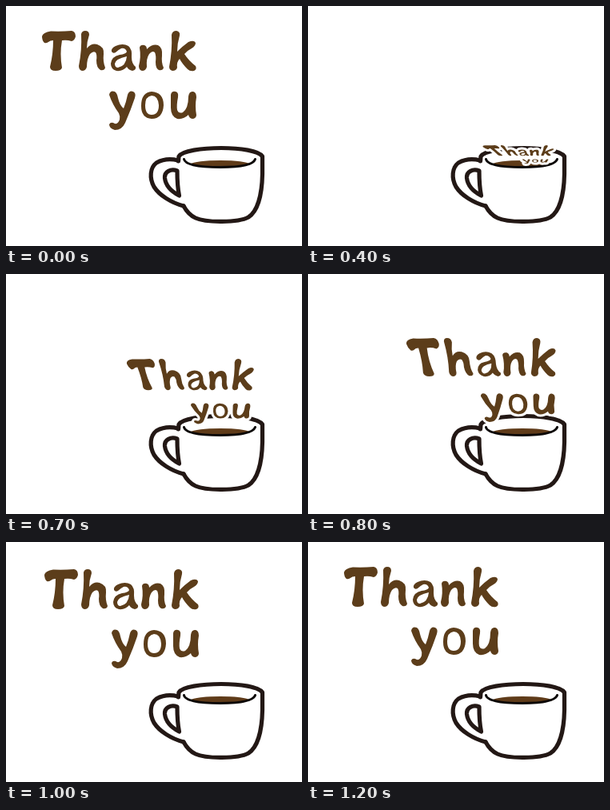
An HTML page for the animation above (1.5 s loop, 370 px wide and 300 px high).

```html
<!DOCTYPE html>
<html lang="en">
<head>
<meta charset="utf-8">
<title>Thank you</title>
<style>
  html, body { margin: 0; width: 100%; height: 100%; overflow: hidden; background: #fff; }
  svg { display: block; width: 370px; height: 300px; }
  .line { fill: none; stroke: #231815; stroke-width: 5.2; stroke-linecap: round; stroke-linejoin: round; }
</style>
</head>
<body>
<svg viewBox="0 0 370 300" role="img" aria-label="Thank you">
  <g class="line">
    <path d="M215,193C207,191 197,191 188,196C180,202 179,215 185,226C192,237 207,246 222,250"/>
    <path d="M214,206C206,203 198,207 198.500,215C199.500,224 207,232 216.500,237Q214,225 214,206Z"/>
    <path d="M215.500,194L216,188C220,181 245,177.500 269,177.500C293,177.500 316,181 320.500,188L320.500,210C320,237 314,257 303,264C290,271 250,271 237,265Q228,261 222,250"/>
  </g>
  <path fill="#5f3b19" d="M229,198Q238,193 268,193Q298,193 306,198Q290,202 268,202Q244,202 229,198Z"/>
  <path d="M222.500,191.500C224,199 243,201.500 268,201.500C293,201.500 309,199 311.500,191.500" fill="none" stroke="#0b0706" stroke-width="3" stroke-linecap="round"/>
  <g id="words">
    <path id="halo" fill="#fff" stroke="#fff" stroke-width="6" stroke-linejoin="round"/>
    <path id="ink" fill="#5c3d1a" fill-rule="evenodd"/>
  </g>
</svg>
<script>
const LOOP = 1500, STEP = 100;
const BOX = { x: 45, y: 31, w: 194, h: 124 };

const letters = [
  // T h a n k
  'M45,38Q46,33 56,31.5Q70,32 82,31Q87,32 87,38Q86,43 82,44Q76,42 70,43Q67,60 70,77Q69,81 62,81Q55,81 55,76Q59,60 59,43Q55,43 53,45Q50,47 48,46Q45,43 45,38Z',
  'M94,35Q95,31 99,31Q104,31 104,36Q101,45 101,53Q107,46 114,48Q123,51 122,60Q121,70 124,77Q123,81 118,80Q113,77 113,68Q114,61 112,58Q109,56 105,60Q101,66 101,76Q100,81 95,81Q91,80 91,75Q95,55 94,35Z',
  'M132,57Q131,53 137,50Q146,46 153,50Q158,54 157,64Q157,72 162,76Q163,80 158,81Q153,80 151,76Q146,82 138,81Q131,79 131,72Q132,63 142,61Q150,60 151,57Q149,52 144,53Q140,55 137,58Q134,60 132,57ZM151,63Q137,66 136,72Q136,77 140,77Q150,75 151,63Z',
  'M167,52Q168,48 173,49Q176,50 176,54Q183,47 190,49Q196,52 195,62Q194,71 197,77Q196,81 191,80Q187,78 187,70Q188,62 186,58Q183,55 179,60Q175,66 176,76Q175,81 170,81Q166,80 166,75Q169,64 167,52Z',
  'M207,36Q208,31 213,31Q218,32 217,37Q214,47 214,57Q221,50 228,45Q235,42 237,46Q237,50 232,53Q226,56 223,60Q229,69 237,75Q239,79 235,81Q230,82 227,79Q220,72 217,66Q213,70 214,77Q213,81 208,81Q204,80 204,76Q208,55 207,36Z',
  // y o u
  'M129,111Q130,105 136,107Q139,109 140,115Q142,124 147,128Q150,121 152,111Q154,105 159,107Q163,109 161,115Q156,130 149,146Q145,155 136,155Q129,153 129,148Q131,144 136,147Q140,148 142,142Q143,138 141,134Q133,123 129,111Z',
  'M182,107Q197,108 197,124Q196,141 182,141Q169,140 169,125Q169,108 182,107ZM182,112Q174,113 174,124Q174,136 182,136Q191,136 191,124Q190,112 182,112Z',
  'M206,111Q207,106 212,107Q216,108 215,114Q213,124 214,130Q216,135 221,133Q228,128 228,113Q229,106 234,107Q238,108 238,114Q236,125 238,136Q238,140 234,141Q229,141 228,136Q222,142 214,141Q206,138 206,127Z'
].join('');

// time, top-left x, top-right x, bottom-left x, bottom-right x, top y, bottom y
const poses = [
  [300, 234, 310, 264, 297, 189, 198],
  [400, 215.5, 311, 250, 298, 174, 197],
  [600, 176, 314, 212.5, 298.5, 132, 190],
  [800, 120.5, 312, 155, 308.5, 80, 185],
  [1000, 48, 242, 48, 242, 34, 158],
  [1100, 42, 236, 42, 236, 28, 152],
  [1200, 45, 239, 45, 239, 31, 155]
];

const [words, halo, ink] = ['words', 'halo', 'ink'].map(id => document.getElementById(id));

function poseAt(time) {
  const next = poses.findIndex(p => p[0] >= time);
  if (next < 0) return poses[poses.length - 1];
  const b = poses[next], a = poses[Math.max(0, next - 1)];
  const k = a === b ? 0 : (time - a[0]) / (b[0] - a[0]);
  return a.map((value, i) => value + (b[i] - value) * k);
}

// Perspective map of the lettering box onto a trapezoid.
function warp(path, [, left, right, lowLeft, lowRight, top, bottom]) {
  const ratio = (lowRight - lowLeft) / (right - left);
  return path.replace(/([\d.]+),([\d.]+)/g, (_, x, y) => {
    const u = (x - BOX.x) / BOX.w, v = (y - BOX.y) / BOX.h;
    const t = v / (ratio + (1 - ratio) * v);
    const l = left + (lowLeft - left) * t, r = right + (lowRight - right) * t;
    return `${(l + (r - l) * u).toFixed(2)},${(top + (bottom - top) * t).toFixed(2)}`;
  });
}

function draw(elapsed) {
  const time = Math.floor(elapsed % LOOP / STEP) * STEP;
  words.style.display = time === 200 ? 'none' : '';
  const shape = warp(letters, poseAt(time < 200 ? LOOP : time));
  halo.setAttribute('d', shape);
  ink.setAttribute('d', shape);
}

const start = performance.now();
function tick() {
  draw(performance.now() - start);
  requestAnimationFrame(tick);
}
tick();
</script>
</body>
</html>
```
